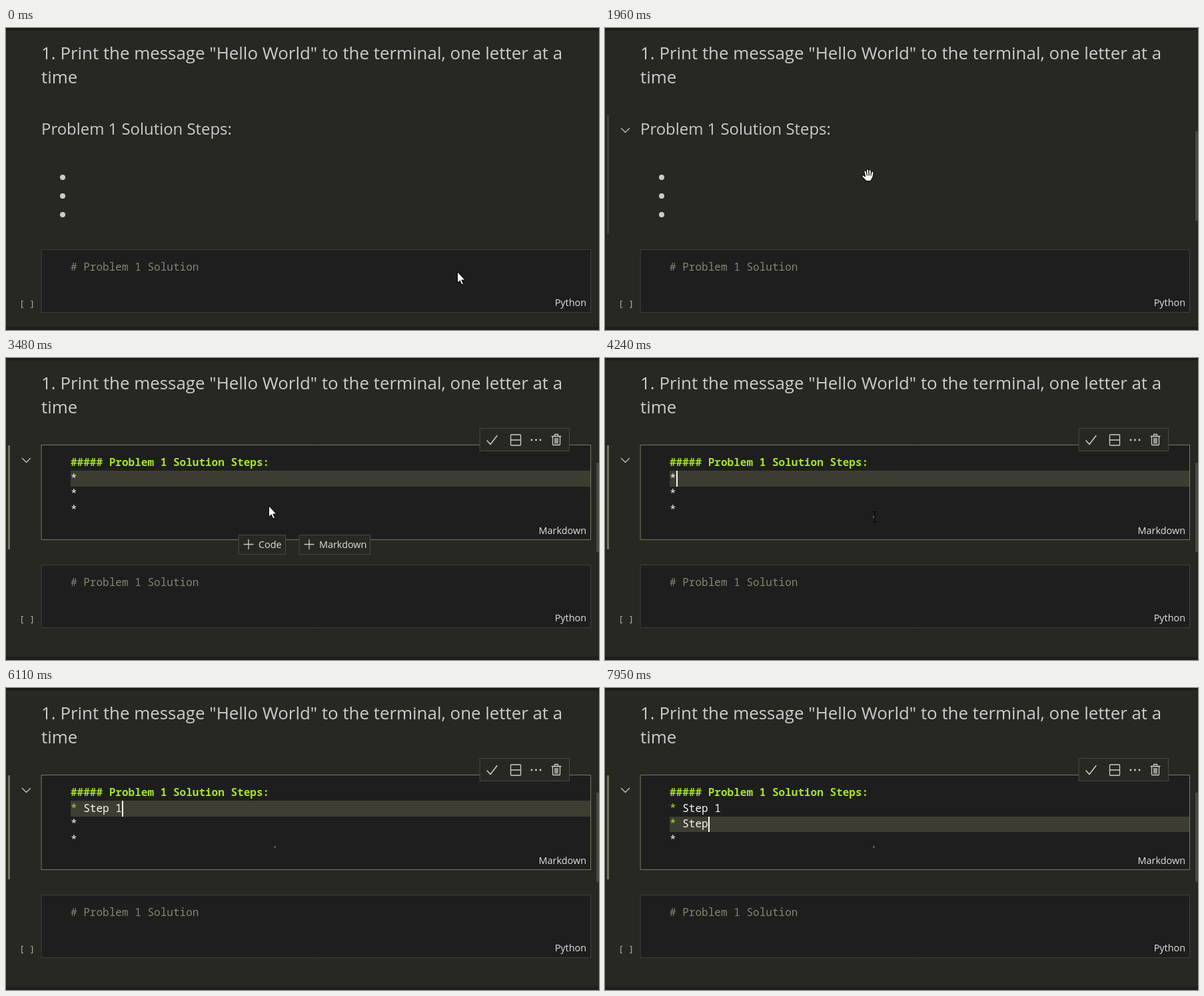
An HTML page with a canvas for the animation above (8000 ms loop, 890x453 px).

```html
<!DOCTYPE html>
<html lang="en">
<head>
<meta charset="utf-8">
<title>Notebook</title>
<style>
html, body { margin: 0; width: 100%; height: 100%; overflow: hidden; background: #272822; }
canvas { display: block; width: 890px; height: 453px; }
</style>
</head>
<body>
<canvas id="stage" width="890" height="453"></canvas>
<script>
const ctx = document.getElementById('stage').getContext('2d');
const LOOP = 8000, TICK = 108.9;
const SANS = '"Open Sans", "Noto Sans", sans-serif';
const MONO = '"Noto Sans Mono", "DejaVu Sans Mono", monospace';
const CODE = '16.04px ' + MONO, LABEL = '14.4px ' + SANS;
const BG = '#272822', EDITOR = '#1e1e1e', LINE = '#40413a', FOCUS = '#7b7864';
const TEXT = '#cccccc', BRIGHT = '#e0e0dc', WHITE = '#f8f8f2';
const GREEN = '#a6e22e', COMMENT = '#88846f';
const COL = 9.624, LEFT = 97, ROW = 23.6;

// pointer path: time, x, y
const PATH = [
  [760, 678, 366], [870, 675, 360], [980, 660, 335], [1090, 640, 305],
  [1200, 618, 280], [1307, 594, 258], [1410, 562, 244], [1520, 520, 232],
  [1630, 476, 225], [1740, 440, 222], [1850, 410, 221], [1958, 395, 221],
  [3160, 395, 222], [3920, 395, 222], [4240, 405, 238]
];

// edits: time, text of both bullets, active row, caret shown
const EDITS = [
  [3160, '*', '*', 0, 0], [4030, '*', '*', 0, 1], [4680, '*', '*', 0, 0],
  [5010, '* ', '*', 0, 1], [5340, '* St', '*', 0, 1], [5450, '* Ste', '*', 0, 1],
  [5670, '* Step', '*', 0, 1], [5780, '* Step ', '*', 0, 1],
  [6110, '* Step 1', '*', 0, 1], [6630, '* Step 1', '*', 1, 1],
  [6960, '* Step 1', '* ', 1, 1], [7400, '* Step 1', '* ', 1, 0],
  [7730, '* Step 1', '* Ste', 1, 1], [7950, '* Step 1', '* Step', 1, 1]
];

const within = (t, a, b) => t >= a && t < b;

function pointerAt(t) {
  const s = Math.floor((t + 15) / TICK) * TICK;
  let i = PATH.findIndex(p => p[0] > s);
  if (i === 0) return PATH[0].slice(1);
  if (i < 0) return PATH[PATH.length - 1].slice(1);
  const [t0, x0, y0] = PATH[i - 1], [t1, x1, y1] = PATH[i];
  const k = (s - t0) / (t1 - t0);
  return [x0 + (x1 - x0) * k, y0 + (y1 - y0) * k].map(Math.round);
}

function rect(x, y, w, h, color) {
  ctx.fillStyle = color;
  ctx.fillRect(x, y, w, h);
}

function box(x, y, w, h, fill, border) {
  rect(x, y, w, h, fill);
  ctx.strokeStyle = border;
  ctx.lineWidth = 1;
  ctx.strokeRect(x + 0.5, y + 0.5, w - 1, h - 1);
}

function text(str, x, y, font, color, align = 'left') {
  ctx.font = font;
  ctx.fillStyle = color;
  ctx.textAlign = align;
  ctx.fillText(str, x, y);
}

function dot(x, y, r, color) {
  ctx.fillStyle = color;
  ctx.beginPath();
  ctx.arc(x, y, r, 0, Math.PI * 2);
  ctx.fill();
}

function lines(d, color, width) {
  ctx.strokeStyle = color;
  ctx.lineWidth = width;
  ctx.stroke(new Path2D(d));
}

function page() {
  rect(0, 0, 890, 453, BG);
  const shade = ctx.createLinearGradient(0, 0, 0, 5);
  shade.addColorStop(0, '#151612');
  shade.addColorStop(1, BG);
  rect(0, 0, 890, 5, shade);
  rect(0, 448, 890, 5, '#1e1f1c');
  const font = '25.9px ' + SANS;
  text('1. Print the message "Hello World" to the terminal, one letter at a', 53, 47, font, TEXT);
  text('time', 53, 83, font, TEXT);
}

function codeCell(y) {
  box(53, y, 825, 95, EDITOR, LINE);
  text('# Problem 1 Solution', LEFT, y + 32, CODE, COMMENT);
  text('Python', 871, y + 85, LABEL, BRIGHT, 'right');
  text('[ ]', 20, y + 86, '13px ' + MONO, '#b4b4ae');
}

function preview() {
  text('Problem 1 Solution Steps:', 53, 160, '23.9px ' + SANS, TEXT);
  for (let i = 0; i < 3; i++) dot(85, 224 + 28 * i, 4, TEXT);
}

function bullet(str, row) {
  const y = 162 + ROW * (row + 1);
  text('*', LEFT, y, CODE, str.length > 1 ? GREEN : WHITE);
  text(str.slice(2), LEFT + 2 * COL, y, CODE, WHITE);
}

function editor(t) {
  const [, first, second, active, caret] = EDITS.filter(e => e[0] <= t).pop();
  box(53, 130, 825, 143, EDITOR, FOCUS);
  const top = active ? 193 : 169, height = active ? 23 : 24;
  rect(LEFT, top, 780, height, '#3e3d32');
  text('##### Problem 1 Solution Steps:', LEFT, 162, 'bold ' + CODE, GREEN);
  [first, second, '*'].forEach(bullet);
  if (caret) {
    const len = (active ? second : first).length;
    rect(Math.round(LEFT + len * COL), top, 2, height, WHITE);
  }
  text('Markdown', 871, 264, LABEL, BRIGHT, 'right');
}

function hoverMarks(selected, editing) {
  rect(3, 131, 3, editing ? 156 : 178, selected ? '#75715e' : '#414239');
  rect(886, editing ? 157 : 155, 4, 134, '#484943');
  lines('M24.5 150.5L30.5 156.5L36.5 150.5', '#c5c5c5', 1.3);
}

function toolbar(editing) {
  box(711, 105, 135, 35, BG, '#494a43');
  const c = '#d0d0cc';
  if (editing) lines('M722 124L727 129.5L737 116.5', c, 1.5);
  else lines('M722 131L723.5 125.5L733.5 115.5Q735.5 114 737 115.5Q738.5 117 737 119L727 129.2ZM724 125.5L727.5 129', c, 1.3);
  lines('M758.5 115h13q1 0 1 1v14q0 1 -1 1h-13q-1 0 -1 -1v-14q0 -1 1 -1ZM757.5 123h15', c, 1.3);
  for (const x of [789, 795.5, 802]) dot(x, 123, 1.4, c);
  lines('M819 117.5h14M823.5 117v-2.5h5v2.5M820.5 118v11.5q0 1 1 1h9q1 0 1 -1v-11.5M824 120.5v7.5M826 120.5v7.5M828 120.5v7.5', c, 1.3);
}

function insertButton(x, w, label) {
  box(x, 265, w, 30, BG, '#494a43');
  lines(`M${x + 8} 279.5h14M${x + 15} 272.5v14`, TEXT, 1.3);
  text(label, x + 30, 285, LABEL, BRIGHT);
}

function arrow() {
  const p = new Path2D('M-0.5 0V16.5L3.2 13L5.9 19L8.5 17.9L5.9 12H10.8Z');
  ctx.fillStyle = '#fff';
  ctx.fill(p);
  ctx.strokeStyle = '#000';
  ctx.lineWidth = 1;
  ctx.stroke(p);
}

function hand() {
  const fingers = 'M-7.5 1.5L-3 6M-4.5 -5.5L-2.5 2M-1 -7.5L0 2M2.7 -7L2.7 2M6.5 -4.2L5.2 3';
  const palm = new Path2D('M-4 0H6L5 5L3.5 8H-2.5L-5 4.5Z');
  lines(fingers, '#000', 4);
  ctx.lineWidth = 2;
  ctx.stroke(palm);
  lines(fingers, '#fff', 2.2);
  ctx.fillStyle = '#fff';
  ctx.fill(palm);
  lines('M-2.6 -4L-1.6 0.5M1 -5V0.5M4.5 -4L4 0.5', '#222', 0.9);
}

function beam() {
  lines('M-3 -7.5h2.5l0.5 0.5l0.5 -0.5H3M0 -7V7.5M-3 8h2.5l0.5 -0.5l0.5 0.5H3', '#070707', 1.2);
}

function pointer(t) {
  const [x, y] = pointerAt(t);
  if (within(t, 2720, 2830) || within(t, 2940, 3050)) dot(395.5, 222.5, 20, '#94958f');
  if (t >= 4240) rect(402, 237, 3, 3, '#555');
  if (t >= 5670) return;
  ctx.save();
  ctx.translate(x, y);
  if (within(t, 1090, 3160)) hand();
  else if (t >= 4140) beam();
  else arrow();
  ctx.restore();
}

function draw(t) {
  const editing = t >= 3160, selected = t >= 2720;
  ctx.lineCap = ctx.lineJoin = 'round';
  page();
  codeCell(editing ? 310 : 332);
  if (editing) editor(t);
  else preview();
  if (t >= 1090) hoverMarks(selected, editing);
  if (selected) toolbar(editing);
  if (within(t, 3370, 4140)) {
    insertButton(349, 71, 'Code');
    insertButton(440, 107, 'Markdown');
  }
  pointer(t);
}

const start = performance.now();
function frame() {
  draw((performance.now() - start) % LOOP);
  requestAnimationFrame(frame);
}
frame();
</script>
</body>
</html>
```
